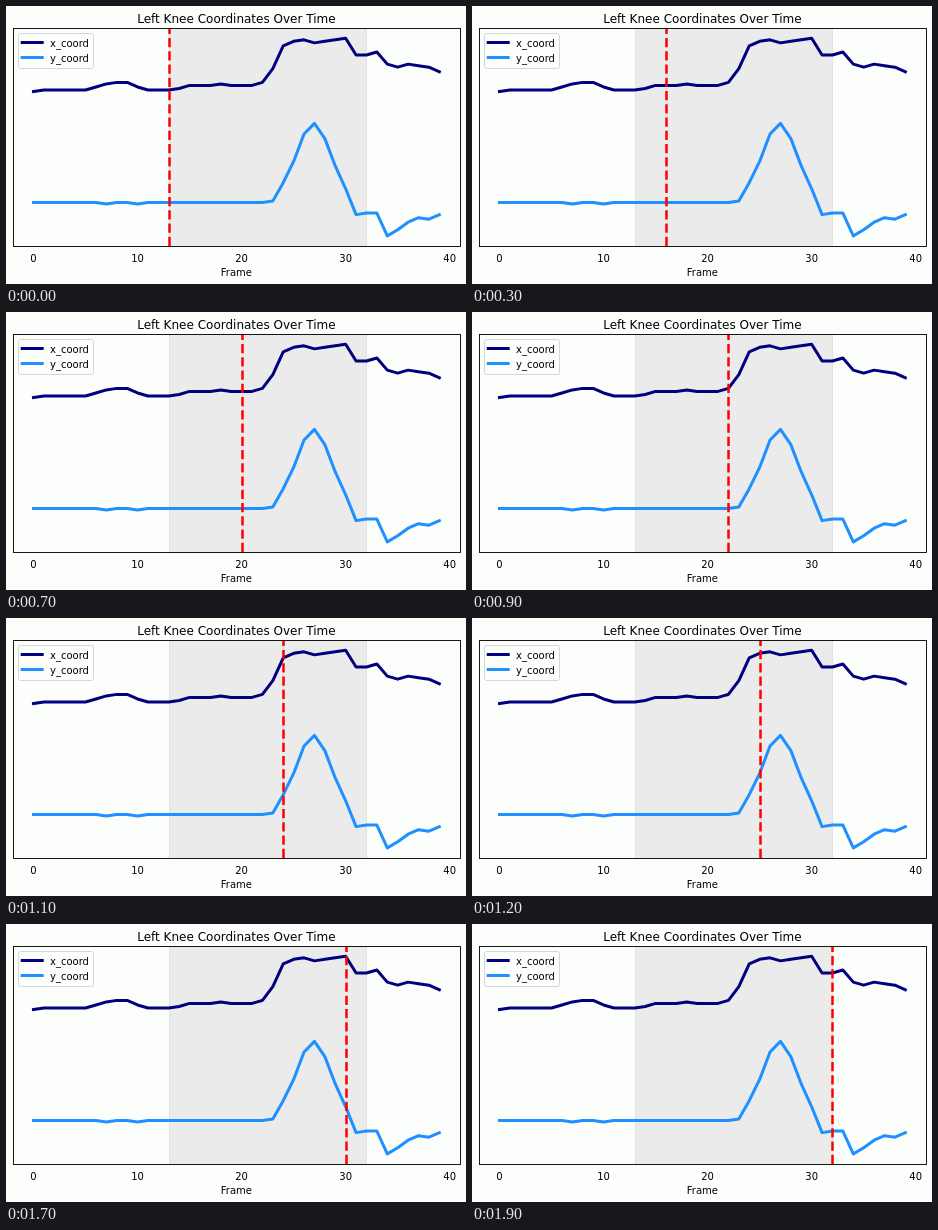
Recreate the animation shown at these times as an HTML page. Size 460x278 px, loop 2 s.

```html
<!DOCTYPE html>
<html lang="en">
<head>
<meta charset="utf-8">
<title>Left Knee Coordinates Over Time</title>
<style>
  html, body { margin: 0; width: 100%; height: 100%; overflow: hidden; background: #fcfefc; }
  svg { display: block; }
  text { font: 10px "DejaVu Sans", sans-serif; }
  .title { font-size: 12px; }
  .middle { text-anchor: middle; }
  .series { fill: none; stroke-width: 3; stroke-linecap: square; stroke-linejoin: round; }
  .x { stroke: #000080; }
  .y { stroke: #1e90ff; }
</style>
</head>
<body>
<svg width="460" height="278" viewBox="0 0 460 278">
  <rect id="span" y="22.5" height="218" fill="#808080" stroke="#808080" opacity="1"
        fill-opacity=".15" stroke-opacity=".15"/>
  <path id="xLine" class="series x"/>
  <path id="yLine" class="series y"/>
  <path id="cursor" stroke="#f00" stroke-width="2.5" stroke-dasharray="9.25 4"/>
  <rect x="7.5" y="22.5" width="447" height="218" fill="none" stroke="#000" stroke-width=".9"/>

  <rect x="12.5" y="27.5" width="75" height="35" rx="2" fill="#fcfefc" fill-opacity=".8" stroke="#ccc" stroke-opacity=".8"/>
  <path class="series x" d="M16.2 36.5h20"/>
  <path class="series y" d="M16.2 51.5h20"/>
  <text x="44" y="41">x_coord</text>
  <text x="44" y="56">y_coord</text>

  <text class="title middle" x="230.4" y="17">Left Knee Coordinates Over Time</text>
  <g id="ticks" class="middle"></g>
  <text class="middle" x="230.4" y="270">Frame</text>
</svg>
<script>
  const FIRST = 13, LAST = 32, STEP_MS = 100, LOOP_MS = 2000;
  const get = id => document.getElementById(id);
  const px = i => 27.49 + 10.406 * i;
  const py = v => 32.3 + 1.52 * v;
  const flat = (value, count) => Array(count).fill(value);

  // Both series are in whole camera pixels, measured from the highest sample.
  const xCoord = [35, ...flat(34, 5), 32, 30, 29, 29, 32, 34, 34, 34, 33, 31, 31, 31, 30, 31, 31, 31,
    29, 20, 5, 2, 1, 3, 2, 1, 0, 11, 11, 9, 17, 19, 17, 18, 19, 22];
  const yCoord = [...flat(108, 7), 109, 108, 108, 109, ...flat(108, 12),
    107, 95, 81, 63, 56, 66, 84, 99, 116, 115, 115, 130, 126, 121, 118, 119, 116];

  const plot = values => "M" + values.map((v, i) => `${px(i)} ${py(v)}`).join("L");
  get("xLine").setAttribute("d", plot(xCoord));
  get("yLine").setAttribute("d", plot(yCoord));

  const snap = x => Math.round(x) + 0.5;
  get("span").setAttribute("x", snap(px(FIRST)));
  get("span").setAttribute("width", snap(px(LAST)) - snap(px(FIRST)));

  get("ticks").innerHTML = [0, 10, 20, 30, 40]
    .map(n => `<text x="${px(n)}" y="256">${n}</text>`).join("");

  function draw(now) {
    const index = FIRST + Math.floor((now % LOOP_MS) / STEP_MS);
    get("cursor").setAttribute("d", `M${snap(px(index))} 240V22.5`);
    requestAnimationFrame(() => draw(performance.now()));
  }
  draw(performance.now());
</script>
</body>
</html>
```
